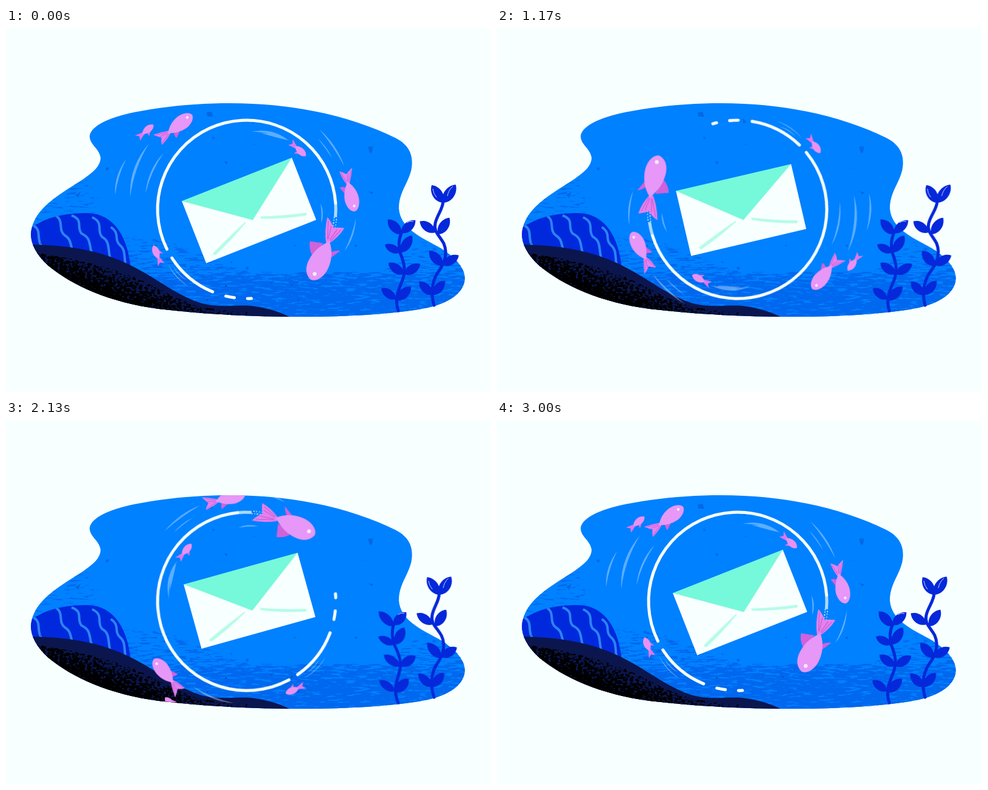
Recreate the animation shown at these times as an HTML page without scripts. Size 800 by 600 pixels, loop 3030 ms.

```html
<!DOCTYPE html>
<html lang="en">
<head>
<meta charset="utf-8">
<title>Letter under water</title>
<style>
html, body { margin: 0; width: 100%; height: 100%; overflow: hidden; background: #f8ffff; }
svg { display: block; width: 800px; height: 600px; }

.spin, .mail, .weed { animation: 3030ms linear infinite; }
.spin { transform-origin: 397px 299px; animation-name: spin; }
.mail { animation-name: rock; }
.left { transform-origin: 647px 467px; animation-name: sway-left; }
.right { transform-origin: 706px 458px; animation-name: sway-right; }

/* opening pose holds for one tick, then the scene cuts ahead and turns in 30 ms ticks */
@keyframes spin {
  0% { transform: rotate(0deg); animation-timing-function: step-end; }
  .891% { transform: rotate(46.5deg); animation-timing-function: steps(99, end); }
  98.911%, 100% { transform: rotate(360deg); }
}
@keyframes rock {
  0%, .98% { transform: translate(400px, 300px) rotate(-21.5deg); animation-timing-function: cubic-bezier(.4, 0, .7, .75); }
  25.74% { transform: translate(401.5px, 298px) rotate(-14.8deg); animation-timing-function: cubic-bezier(.35, .6, .7, 1); }
  46.5% { transform: translate(402px, 299.3px) rotate(-12.8deg); animation-timing-function: cubic-bezier(.3, 0, .65, .45); }
  70.3% { transform: translate(401px, 297px) rotate(-15.5deg); }
  86.14% { transform: translate(400px, 296.3px) rotate(-20.5deg); animation-timing-function: cubic-bezier(.4, .5, .7, 1); }
  99%, 100% { transform: translate(400px, 300px) rotate(-21.5deg); }
}
@keyframes sway-left {
  0% { transform: skewX(0deg); animation-timing-function: step-end; }
  .98% { transform: skewX(-4.3deg); animation-timing-function: cubic-bezier(.5, .75, .75, 1); }
  13.9% { transform: skewX(-5.7deg); animation-timing-function: cubic-bezier(.37, 0, .63, 1); }
  70.3% { transform: skewX(5.7deg); animation-timing-function: cubic-bezier(.33, 0, .67, .5); }
  99%, 100% { transform: skewX(0deg); }
}
@keyframes sway-right {
  0% { transform: skewX(0deg); animation-timing-function: step-end; }
  .98% { transform: skewX(-3.1deg); animation-timing-function: cubic-bezier(.5, .75, .75, 1); }
  14.8% { transform: skewX(-4.2deg); animation-timing-function: cubic-bezier(.37, 0, .63, 1); }
  70.3% { transform: skewX(2.15deg); animation-timing-function: cubic-bezier(.33, 0, .67, .5); }
  99%, 100% { transform: skewX(0deg); }
}
</style>
</head>
<body>
<svg viewBox="0 0 800 600">
<defs>
  <clipPath id="pool">
    <path d="M370 124C482 124 574 148 642 181C668 194 673 214 668 236C662 258 648 272 648 297C650 330 685 345 712 360C745 379 757 398 757 413C755 440 725 457 680 464C620 473 560 476 475 476C410 476 330 472 252 463C170 452 110 425 70 392C50 374 41 356 41 340C43 310 65 290 95 270C125 250 156 235 156 214C154 198 138 193 138 178C140 160 175 145 222 137C270 128 320 124 370 124Z"/>
  </clipPath>
  <clipPath id="stone"><path d="M30 338C60 312 95 305 135 305C178 306 202 345 206 400H30Z"/></clipPath>

  <!-- source opacity sets how densely the grain covers -->
  <filter id="brush" filterUnits="userSpaceOnUse" x="30" y="110" width="740" height="380" color-interpolation-filters="sRGB">
    <feTurbulence type="fractalNoise" baseFrequency=".05 .33" numOctaves="3" seed="7"/>
    <feColorMatrix values="0 0 0 0 0  0 0 0 0 0  0 0 0 0 0  1 0 0 0 0" result="n"/>
    <feComposite in="SourceAlpha" in2="n" operator="arithmetic" k2=".8" k3="1"/>
    <feComponentTransfer result="grain"><feFuncA type="linear" slope="14" intercept="-11.9"/></feComponentTransfer>
    <feFlood flood-color="#0068ee"/>
    <feComposite in2="grain" operator="in"/>
  </filter>
  <filter id="soot" filterUnits="userSpaceOnUse" x="30" y="340" width="460" height="150" color-interpolation-filters="sRGB">
    <feTurbulence type="fractalNoise" baseFrequency=".2 .26" numOctaves="3" seed="3"/>
    <feColorMatrix values="0 0 0 0 0  0 0 0 0 0  0 0 0 0 0  1 0 0 0 0" result="n"/>
    <feComposite in="SourceAlpha" in2="n" operator="arithmetic" k2=".8" k3="1"/>
    <feComponentTransfer result="grain"><feFuncA type="linear" slope="14" intercept="-11.9"/></feComponentTransfer>
    <feFlood flood-color="#000"/>
    <feComposite in2="grain" operator="in"/>
  </filter>
  <linearGradient id="deep" gradientUnits="userSpaceOnUse" x1="0" y1="335" x2="0" y2="475">
    <stop stop-opacity=".3"/><stop offset=".48" stop-opacity=".42"/>
    <stop offset=".55" stop-opacity=".58"/><stop offset="1" stop-opacity=".7"/>
  </linearGradient>
  <linearGradient id="dusk" gradientUnits="userSpaceOnUse" x1="160" y1="380" x2="140" y2="432">
    <stop stop-opacity=".25"/><stop offset=".4" stop-opacity=".48"/>
    <stop offset=".7" stop-opacity=".64"/><stop offset="1" stop-opacity=".8"/>
  </linearGradient>

  <path id="leaf" d="M0 0C-11 -8 -10 -25 0 -33C10 -25 11 -8 0 0Z"/>

  <g id="big">
    <path fill="#d062dc" d="M-28 6L-22 28Q-10 25 -3 16ZM-10 -14L-28 -24Q-25 -15 -18 -10Z"/>
    <path fill="#e481ee" d="M-31 -2Q-48 -13 -65 -15Q-62 -5 -58 1Q-66 9 -70 18Q-46 13 -31 3Z"/>
    <path fill="none" stroke="#c75fd6" stroke-width="1.3" d="M-36 -3L-60 -11M-37 -1L-58 -5M-37 2L-60 6M-37 3L-65 14"/>
    <path fill="#e697f7" d="M-35 -1C-20 -17 6 -21 21 -15C31 -11 36 -4 35 2C31 13 20 18 6 17C-12 16 -24 8 -35 -1Z"/>
    <circle cx="24" cy="-1" r="3.2" fill="#fbeaff"/>
  </g>
  <g id="mid">
    <path fill="#d062dc" d="M-19 15Q-20 8 -15 4L-7 9Z"/>
    <path fill="#e481ee" d="M-21 -2Q-34 -9 -46 -13Q-42 -6 -38 -1Q-43 4 -45 9Q-30 7 -21 2Z"/>
    <path fill="none" stroke="#c75fd6" d="M-25 -2L-42 -10M-26 0L-39 -4M-25 2L-42 7"/>
    <path fill="#e697f7" d="M-25 0C-14 -11 2 -14 14 -10C22 -7 25 -3 25 1C23 8 14 12 4 12C-8 11 -18 6 -25 0Z"/>
    <circle cx="16" cy="-1" r="2.2" fill="#fbeaff"/>
  </g>
  <g id="tiny">
    <path fill="#e076ea" d="M-8 -1L-23 -6L-18 0L-22 6L-8 2ZM-6 10L-4 4L2 5Z"/>
    <path fill="#e991f3" d="M-12 0C-6 -7 6 -8 12 0C7 8 -5 7 -12 0Z"/>
  </g>
</defs>

<rect width="800" height="600" fill="#f8ffff"/>
<g clip-path="url(#pool)">
  <rect width="800" height="600" fill="#0081ff"/>
  <g filter="url(#brush)">
    <path fill="url(#deep)" d="M195 340L270 352L340 380L400 402H620L690 350L765 380V490H195Z"/>
    <path fill-opacity=".31" d="M40 330L60 285L110 255L140 250L150 305L110 312Z"/>
  </g>
  <g fill="#0068e6">
    <path d="M331 139L339 138L342 146L332 146ZM597 196L605 195L604 205L600 206ZM360 219L366 221L363 225ZM114 275L123 270L119 280ZM405 149L411 154L407 158ZM598 269L606 271L603 274Z"/>
    <circle cx="342" cy="181" r="1.8"/><circle cx="167" cy="232" r="2.4"/>
    <circle cx="577" cy="359" r="2"/><circle cx="398" cy="396" r="2.4"/>
    <circle cx="372" cy="386" r="1.5"/><circle cx="588" cy="231" r="1"/>
  </g>

  <g clip-path="url(#stone)">
    <rect x="30" y="300" width="180" height="110" fill="#0029de"/>
    <path fill="none" stroke="#2c84f2" stroke-width="4" d="M46 326C60 335 48 346 61 364M80 308C97 317 85 331 96 341C109 349 105 357 111 370M108 309C129 316 115 329 125 339C142 347 136 359 143 376M142 312C162 321 149 333 158 344C173 352 167 366 173 384M173 328C189 340 177 347 188 358C198 366 194 378 198 395"/>
  </g>
  <path fill="#0b164f" d="M30 357C110 357 165 369 215 396C250 414 280 440 320 453C350 462 380 456 405 458C435 462 455 469 475 480H30Z"/>
  <path fill="url(#dusk)" filter="url(#soot)" d="M45 370C120 380 185 396 235 421C270 439 300 456 330 461C370 465 420 468 440 480H40Z"/>

  <g class="spin">
    <g fill="#fff" opacity=".36">
      <path d="M517 167Q546 193 558 228Q541 196 517 167ZM514 182Q530 196 538 215Q528 199 514 182Z"/>
      <path d="M577 314Q576 345 558 368Q571 343 577 314ZM519 289Q526 305 520 322Q521 305 519 289Z"/>
      <path d="M405 171Q440 164 467 186Q438 171 405 171ZM420 173Q445 173 464 185Q440 179 420 173Z"/>
      <path d="M267 389Q281 412 301 426Q279 414 267 389ZM276 394Q286 407 298 416Q284 409 276 394Z"/>
      <path d="M180 275Q178 244 198 216Q184 245 180 275ZM205 278Q202 230 236 190Q211 231 205 278ZM230 273Q234 233 260 206Q239 236 230 273Z"/>
    </g>
    <g fill="none" stroke="#f8ffff" stroke-width="5">
      <circle cx="397" cy="299" r="147" pathLength="360" stroke-linecap="round" stroke-dasharray="2.5 8.5 5.5 9 34.5 6.5 202.5 91" transform="rotate(87 397 299)"/>
      <circle cx="397" cy="299" r="147" pathLength="360" stroke-opacity=".7" stroke-dasharray="9 351" transform="rotate(-4 397 299)"/>
      <circle cx="396" cy="299" r="146" pathLength="360" stroke-width="2" stroke-opacity=".8" stroke-dasharray=".8 .9 .6 1.1 .9 1 .7 354" transform="rotate(5 397 299)"/>
      <circle cx="398" cy="299" r="148" pathLength="360" stroke-width="1.6" stroke-opacity=".8" stroke-dasharray="1 .8 .7 1.2 .6 1.1 .6 354" transform="rotate(6 397 299)"/>
    </g>
    <use href="#big" transform="translate(518 383) rotate(114)"/>
    <use href="#mid" transform="translate(569.5 278) rotate(76)"/>
    <use href="#mid" transform="translate(287 158) rotate(-38)"/>
    <use href="#tiny" transform="translate(234 167) rotate(-40)"/>
    <use href="#tiny" transform="translate(486 203) rotate(42)"/>
    <use href="#tiny" transform="translate(247.5 369.5) rotate(-112)"/>
  </g>

  <g class="mail">
    <path fill="#f8ffff" d="M-97 -54H98V56H-97Z"/>
    <path fill="#76f8da" d="M-97 -54H98L.5 18Z"/>
    <path fill="#b6fbe9" d="M-12 16Q-50 31 -81 45Q-81 49 -77 49Q-44 36 -12 18ZM14 17Q50 30 87 39Q88 43 84 43Q48 35 14 21Z"/>
  </g>
</g>

<g fill="#0428da">
  <g class="weed left">
    <path fill="none" stroke="#0428da" stroke-width="5" stroke-linecap="round" d="M647 466C641 448 646 435 653 418C661 400 656 385 650 370C647 358 648 348 652 338"/>
    <use href="#leaf" transform="translate(652 340) rotate(-42)"/>
    <use href="#leaf" transform="translate(652 338) rotate(48) scale(.95)"/>
    <use href="#leaf" transform="translate(650 370) rotate(-63) scale(.85)"/>
    <use href="#leaf" transform="translate(652 370) rotate(32)"/>
    <use href="#leaf" transform="translate(656 406) rotate(-53) scale(.95)"/>
    <use href="#leaf" transform="translate(657 406) rotate(57) scale(.95)"/>
    <use href="#leaf" transform="translate(643 447) rotate(-53) scale(.9)"/>
    <use href="#leaf" transform="translate(644 449) rotate(47)"/>
    <path fill="none" stroke="#f8ffff" stroke-width=".8" d="M661 321Q667 317 672 319"/>
  </g>
  <g class="weed right">
    <path fill="none" stroke="#0428da" stroke-width="5" stroke-linecap="round" d="M706 457C701 440 702 420 711 405C722 390 730 374 722 355C715 342 705 336 708 322C711 308 720 300 721 286"/>
    <use href="#leaf" transform="translate(721 288) rotate(-33) scale(1.05)"/>
    <use href="#leaf" transform="translate(721 288) rotate(35) scale(1.1)"/>
    <use href="#leaf" transform="translate(708 337) rotate(-54) scale(.95)"/>
    <use href="#leaf" transform="translate(713 340) rotate(34)"/>
    <use href="#leaf" transform="translate(720 392) rotate(-41)"/>
    <use href="#leaf" transform="translate(720 391) rotate(59) scale(.95)"/>
    <use href="#leaf" transform="translate(703 440) rotate(-44) scale(.93)"/>
    <use href="#leaf" transform="translate(704 440) rotate(40) scale(.93)"/>
    <path fill="none" stroke="#f8ffff" stroke-width=".8" d="M704 265Q705 273 710 279M728 277Q730 267 737 261"/>
  </g>
</g>
</svg>
</body>
</html>
```
